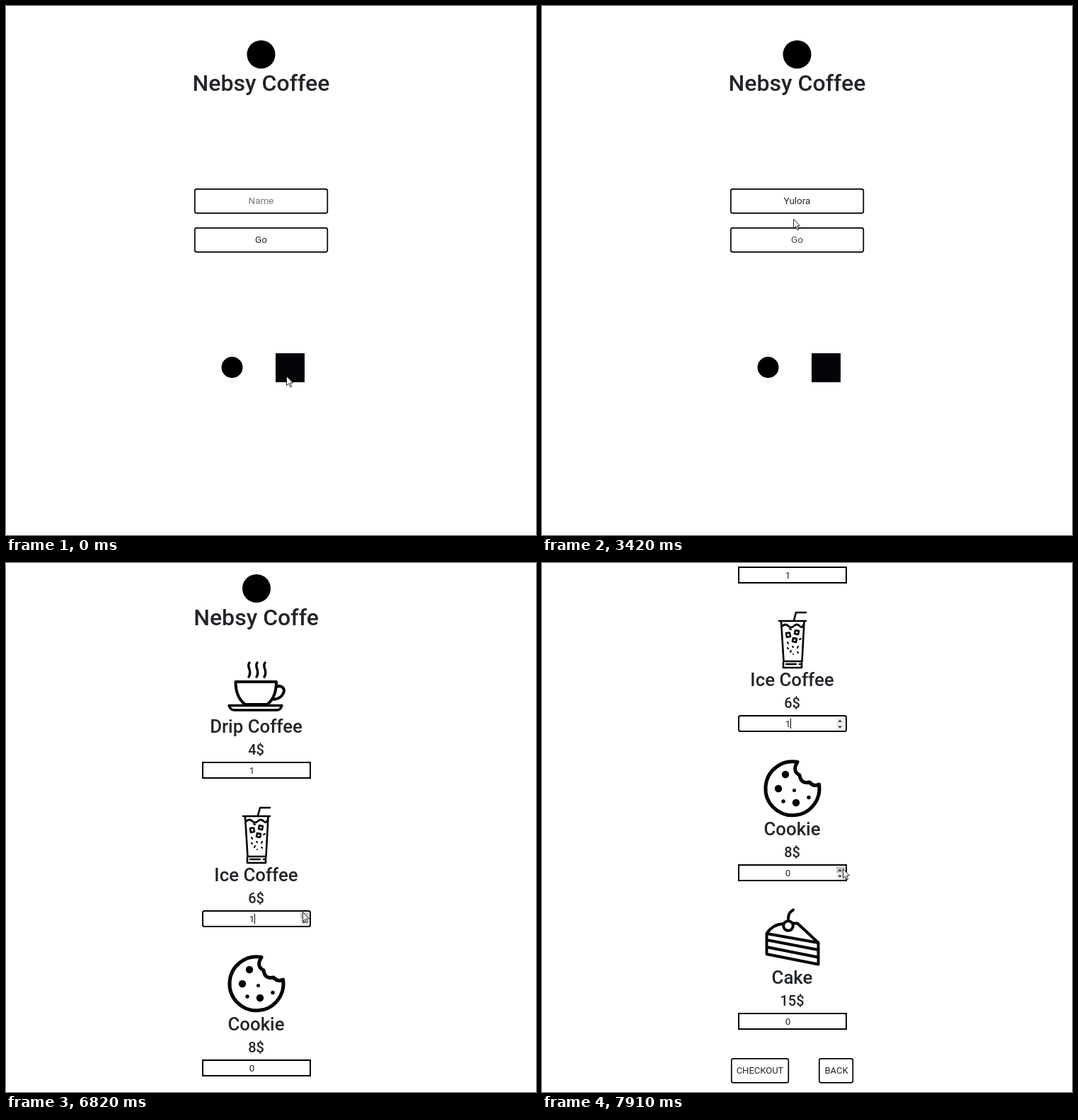
Animation, 749 px wide and 748 px high, one loop 7.99 s. Source, as an HTML page:

```html
<!DOCTYPE html>
<html lang="en">
<head>
<meta charset="utf-8">
<title>Coffee order</title>
<style>
  html, body { margin: 0; width: 100%; height: 100%; overflow: hidden; background: #fff; }
  svg { display: block; width: 100%; height: 100%; font-family: Roboto, Arial, sans-serif; }
  text { text-anchor: middle; fill: #212529; white-space: pre; }
  .h1, .h2, .h3 { font-weight: 500; }
  .h1 { font-size: 32px; }
  .h2 { font-size: 25.8px; }
  .h3 { font-size: 20px; }
  .field { font-size: 13.5px; }
  .num { font-size: 13.33px; }
  .button { font-size: 13px; }
  .box { fill: #fff; stroke: #000; stroke-width: 2; }
  .frame { fill: #fff; stroke: #000; stroke-width: 1.7; rx: 2.5px; }
  .line { fill: none; stroke: #000; stroke-width: 4; stroke-linecap: round; stroke-linejoin: round; }
  .thin { stroke-width: 2.6; }
  .thick { stroke-width: 5; }
  .pointer { fill: #fff; stroke: #222; stroke-width: 1; stroke-linejoin: round; }
</style>
</head>
<body>
<svg viewBox="0 0 749 748">
  <defs>
    <g id="cup" class="line">
      <path d="M324.5 168H382C382 184 377 194 369 200H338C330 194 324.5 184 324.5 168Z"/>
      <path d="M382 175C390 172 395 178 392 184C389 191 382 193 376 193"/>
      <path d="M315 201.5H390Q388 208 383 208H323Q317 208 315 201.5Z" stroke-width="3.4"/>
      <path id="steam" d="M344 141C339 147 349 152 343 161" stroke-width="3.4"/>
      <use href="#steam" x="11"/><use href="#steam" x="22"/>
    </g>
    <g id="iced" class="line thin">
      <path d="M356 147L359 136H373M335 148H373M338 149L341.5 205H367.5L370.5 149M341 207V214H367V207M345 209H359M364 209H365"/>
      <path d="M340 155Q344 151 348 155T356 155T364 155T369 154"/>
      <path d="M345 165L350 164.5L351 170L346 171ZM358 161L363 162L362 167L357 166ZM355 172L360 173L359 178L354 177Z"/>
      <path d="M350 159L352 160M364 174L366 173M347 178L348 180M347 186L348 187M354 184L355 185M361 186L362 184M352 190L351 192M355 195V195M361 192L362 193" stroke-width="2"/>
    </g>
    <g id="cookie">
      <path class="line thick" d="M361 136.5A38 38 0 1 0 391.5 168Q384 172 378 165Q366 168 364 155Q353 149 361 136.5"/>
      <circle cx="344" cy="154" r="5.2"/><circle cx="334" cy="174" r="5.2"/><circle cx="359" cy="194" r="5.2"/>
      <circle cx="356.5" cy="176.5" r="2.5"/><circle cx="341" cy="192" r="2.7"/><circle cx="377" cy="186.5" r="2.7"/>
    </g>
    <g id="cake" class="line">
      <path d="M317.5 169Q326 156 341 155M355 154.5H361L390.5 182V212.5L317.5 198V169L390.5 182M317.5 178L390.5 192M317.5 188L390.5 202.5"/>
      <circle cx="348" cy="158" r="6.8"/>
      <path d="M348 151Q347 140 355 135.5"/>
    </g>
  </defs>

  <g id="login">
    <circle cx="360.5" cy="68.5" r="20"/>
    <text class="h1" x="360.5" y="120">Nebsy Coffee</text>
    <rect class="frame" x="266.8" y="258.8" width="187.5" height="34"/>
    <text id="name" class="field" x="360.5" y="280"></text>
    <rect class="frame" x="266.8" y="313.8" width="187.5" height="34"/>
    <text id="go" class="field" x="360.5" y="335">Go</text>
    <circle cx="319.5" cy="511" r="15"/>
    <rect x="381" y="491" width="41" height="41" fill="#050308"/>
    <rect id="nameCaret" y="268" width="1" height="15"/>
  </g>

  <g id="menu">
    <circle cx="354" cy="36" r="20"/>
    <text class="h1" x="353.5" y="88">Nebsy Coffe</text>
    <g id="items"></g>
    <g id="actions">
      <rect class="frame" x="267.8" y="976.8" width="80.5" height="34"/>
      <text class="button" x="308" y="997.5">CHECKOUT</text>
      <rect class="frame" x="391.8" y="976.8" width="47.5" height="34"/>
      <text class="button" x="416" y="997.5">BACK</text>
    </g>
  </g>

  <g id="pointer">
    <path id="arrow" class="pointer" d="M.5 .5V13.5L3.5 10.7L5.7 15.8L7.7 15L5.5 10H9.5Z"/>
    <path id="beam" fill="none" stroke="#333" d="M-2.5 -6.5H-.5L.5 -5.5L1.5 -6.5H3.5M.5 -5.5V5.5M-2.5 6.5H-.5L.5 5.5L1.5 6.5H3.5"/>
    <path id="hand" class="pointer" d="M-1 11V1.5Q.5 -.5 2 1.5V6.5Q3.5 5 4.7 7Q6 5.8 7.2 7.5Q9 6.8 9.3 9V13Q9 16 7.5 18.5H0Q-1.5 16 -4 12.5Q-4.5 9.5 -1 11ZM2 6.5V10M4.7 7V10M7.2 7.5V10"/>
  </g>
</svg>
<script>
const LOOP = 7990, PAGE = 4280, LOADED = 4340;
const $ = id => document.getElementById(id);
const show = (el, on) => el.setAttribute('visibility', on ? 'inherit' : 'hidden');
const move = (el, x, y) => el.setAttribute('transform', `translate(${x} ${y})`);

const items = [
  ['cup', 'Drip Coffee', 4, 5640],
  ['iced', 'Ice Coffee', 6, 6740],
  ['cookie', 'Cookie', 8, Infinity],
  ['cake', 'Cake', 15, Infinity]
].map(([icon, label, price, click]) => {
  const el = document.createElementNS('http://www.w3.org/2000/svg', 'g');
  el.innerHTML = `<use href="#${icon}"/>
    <text class="h2" x="353.5" y="239.5">${label}</text>
    <text class="h3" x="353.5" y="270.5">${price}$</text>
    <rect class="box" x="278" y="282" width="152" height="22"/>
    <text class="num" x="347.5" y="297.5">0</text>
    <rect class="caret" x="351" y="286" width="1" height="14"/>
    <g class="spin"><path fill="#efefef" d="M416 284h12v19h-12z"/>
      <path class="up" fill="#c9c9c9" d="M416 284h12v9h-12z"/>
      <path fill="#444" d="M418 291l3-3.5 3 3.5zM418 296.5l3 3.5 3-3.5z"/></g>`;
  $('items').append(el);
  const part = s => el.querySelector(s);
  return { el, click, icon: part('use'), box: part('.box'), num: part('.num'),
           caret: part('.caret'), spin: part('.spin'), up: part('.up') };
});

// time, x, y
const path = [
  [70, 396, 523], [480, 350, 276], [3150, 350, 276], [3750, 362, 334],
  [4940, 362, 334], [5600, 419, 288], [5740, 419, 288], [5880, 420, 323],
  [6490, 419, 493], [7020, 419, 493], [7160, 424, 490], [7430, 430, 495],
  [7580, 430, 495], [7850, 425, 432]
];
const scroll = [[7060, 0], [7160, 88], [7290, 188], [7430, 251], [7540, 276]];
const keys = [[1540, 'Y'], [1810, 'u'], [2070, 'l'], [2140, 'o'], [2400, 'r'], [2530, 'a']];

function at(track, t, ease = k => k) {
  const i = track.findIndex(p => p[0] > t);
  if (i < 0) return track.at(-1).slice(1);
  if (!i) return track[0].slice(1);
  const [a, b] = [track[i - 1], track[i]];
  const k = ease((t - a[0]) / (b[0] - a[0]));
  return a.slice(1).map((v, j) => v + (b[j + 1] - v) * k);
}
const smooth = k => k * k * (3 - 2 * k);
const blink = (t, since) => t >= since && (t - since) % 1060 < 530;

function login(t) {
  const typed = keys.filter(k => t >= k[0]);
  const text = typed.map(k => k[1]).join('');
  const name = $('name');
  name.textContent = text || 'Name';
  name.style.fill = text ? '#212529' : '#7a756c';
  $('go').style.fill = t < 400 ? '#212529' : '#484848';
  const width = text ? name.getComputedTextLength() : 0;
  $('nameCaret').setAttribute('x', Math.round(360 + width / 2));
  show($('nameCaret'), t < 3880 && blink(t, typed.length ? typed.at(-1)[0] : 680));
}

function menu(t, x, y, top) {
  const loaded = t >= LOADED;
  const pitch = loaded ? 210.25 : 148.75;
  const focus = items.findLast(it => t >= it.click);
  let overText = false;
  items.forEach((it, i) => {
    const dy = Math.round(i * pitch), localY = y + top - dy;
    const hover = x > 277 && x < 431 && localY > 281 && localY < 306;
    overText ||= hover && x < 414;
    move(it.el, 0, dy);
    show(it.icon, !i || loaded);
    it.box.setAttribute('rx', it === focus ? 2.5 : 0);
    it.num.textContent = +(t >= it.click);
    show(it.caret, it === focus && blink(t, it.click));
    show(it.spin, hover || it === focus);
    show(it.up, hover && x >= 414 && localY < 293);
  });
  show($('actions'), loaded);
  move($('menu'), 0, -top);
  return overText;
}

function draw(t) {
  const [x, y] = at(path, t, smooth).map(Math.round);
  const top = Math.round(at(scroll, t)[0]);
  const onMenu = t >= PAGE;
  show($('login'), !onMenu);
  show($('menu'), onMenu);
  let kind = 'arrow';
  if (onMenu) {
    if (menu(t, x, y, top)) kind = 'beam';
    else if (t < 4950) kind = 'hand';
  } else {
    login(t);
    if (y > 258 && y < 293) kind = 'beam';
    else if (y > 312 && y < 349) kind = 'hand';
  }
  for (const k of ['arrow', 'beam', 'hand']) show($(k), k === kind);
  move($('pointer'), x, y);
}

const start = performance.now();
function frame() {
  draw((performance.now() - start) % LOOP);
  requestAnimationFrame(frame);
}
frame();
</script>
</body>
</html>
```
